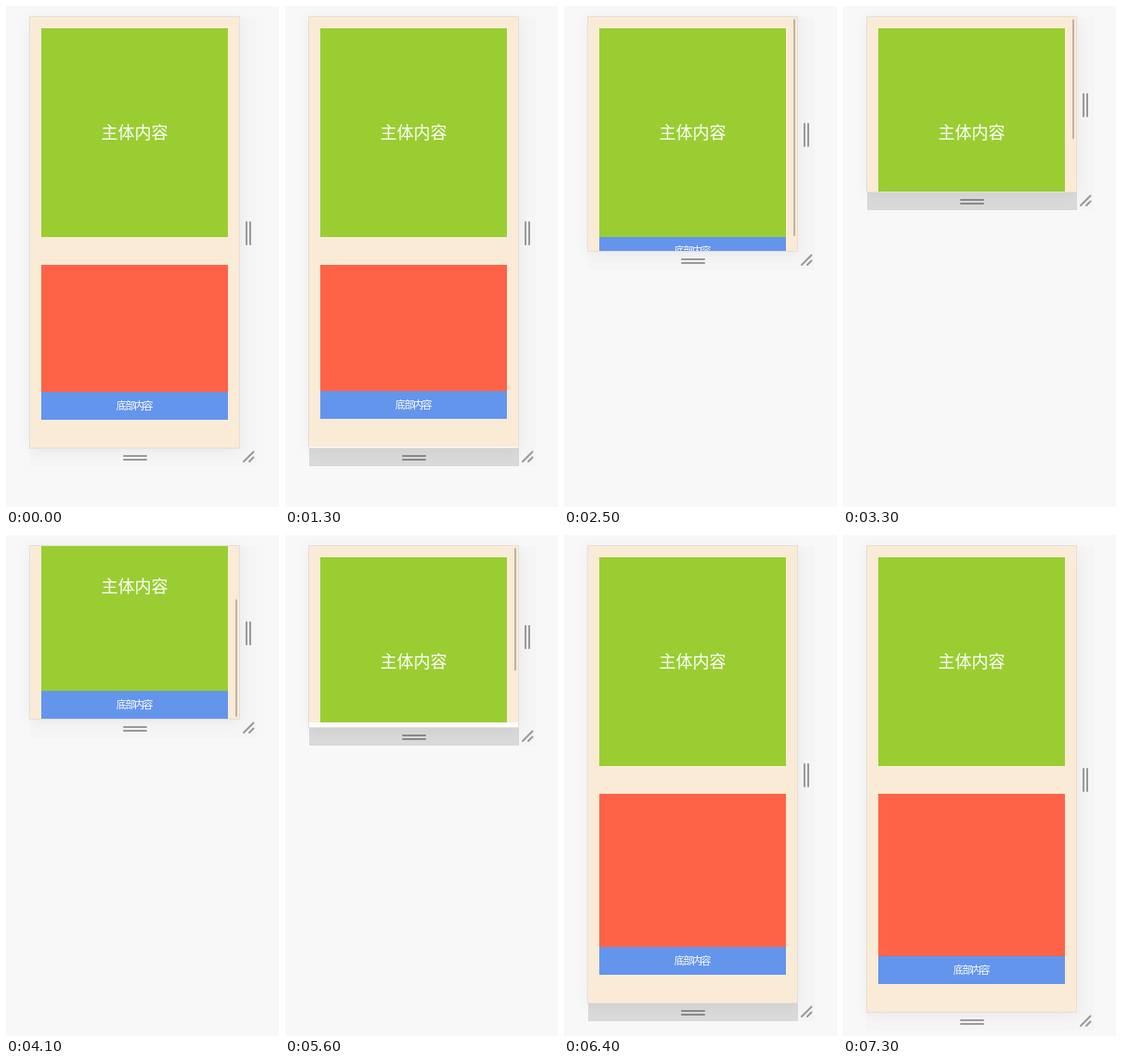
Write an HTML page that moves like this. It is 294x540 px and loops after 7800 ms.

```html
<!DOCTYPE html>
<html lang="zh-CN">
<head>
<meta charset="utf-8">
<title>Sticky footer</title>
<style>
  html, body { margin: 0; width: 100%; height: 100%; overflow: hidden; background: #f8f8f8; }
  svg { display: block; width: 294px; height: 540px; }
  text { fill: #fff; text-anchor: middle; font-weight: 500; font-family: "Noto Sans CJK SC", "Noto Sans CJK", "Noto Sans CJK JP", sans-serif; }
  .small { font-size: 11px; letter-spacing: -1.4px; }
  .grip { fill: none; stroke: #999; stroke-width: 2; stroke-linecap: round; }
  .hover { stroke: #888; }
</style>
</head>
<body>
<svg viewBox="0 0 294 540">
  <defs>
    <filter id="blur" filterUnits="userSpaceOnUse" x="-40" y="-40" width="380" height="640">
      <feGaussianBlur stdDeviation="8"/>
    </filter>
    <clipPath id="view"><rect id="clip" x="26" y="12" width="225"/></clipPath>
  </defs>

  <rect id="handles" x="26" y="12" width="244" fill="#f5f5f5"/>
  <rect id="bar" x="26" width="226" height="20" fill="#d9d9d9"/>
  <rect id="shadow" x="26" y="14" width="225" fill="#000" opacity=".06" filter="url(#blur)"/>
  <rect id="frame" x="25.5" y="11.5" width="226" fill="#fff" stroke="#e4dfd8"/>

  <g clip-path="url(#view)">
    <rect x="26" y="12" width="225" height="528" fill="antiquewhite"/>
    <g id="page">
      <rect x="38" y="24" width="201" height="225" fill="yellowgreen"/>
      <text x="138.5" y="143" font-size="18">主体内容</text>
      <rect id="aside" x="38" y="279" width="201" fill="tomato"/>
      <g id="footer">
        <rect x="38" width="201" height="30" fill="cornflowerblue"/>
        <text class="small" x="138" y="19">底部内容</text>
      </g>
    </g>
    <rect id="thumb" x="247" width="2" rx="1" fill="#000"/>
  </g>

  <path id="sideGrip" class="grip" d="M259-12V12M263-12V12"/>
  <g id="bottom">
    <path id="barGrip" class="grip" d="M127 9H151M127 13H151"/>
    <path class="grip" d="M256 15L266.5 4.5M262 15L266.5 10.5"/>
  </g>
</svg>
<script>
  const LOOP = 7800, STEP = 100;
  const TOP = 12, CONTENT_END = 279, FOOT = 30;
  const TALL = 476, SHORT = 198, MID = 436, FULL = 514;

  const el = Object.fromEntries([...document.querySelectorAll('[id]')].map(e => [e.id, e]));
  const set = (id, attrs) => {
    for (const name in attrs) el[id].setAttribute(name, attrs[name]);
  };
  const move = (id, y) => set(id, { transform: `translate(0 ${y})` });

  const easeIn = n => p => p ** n;
  const easeOut = n => p => 1 - (1 - p) ** n;
  const linear = p => p;
  const ramp = (t, from, to, ease = linear) =>
    ease(Math.min(1, Math.max(0, (t - from) / (to - from))));

  // Bottom edge: dragged up, then pulled down quickly and settled.
  const edgeAt = t => TALL
    + (SHORT - TALL) * ramp(t, 1300, 3400, easeOut(1.7))
    + (MID - SHORT) * ramp(t, 5550, 6000, easeIn(1.5))
    + (FULL - MID) * ramp(t, 6000, 6500, easeOut(1.3));

  // The page repaints late when a drag begins, then catches up.
  const late = (t, from, to, size) => t < from ? 0 : size * (1 - ramp(t, from, to));
  const gapAt = t => late(t, 1300, 3400, 1) + late(t, 5550, 6000, 5.6);

  const scrollAt = t => (CONTENT_END - SHORT) * (ramp(t, 3500, 4100) - ramp(t, 4300, 4700));
  const thumbAlpha = t => 1 - ramp(t, 4900, 5300) + ramp(t, 5500, 5600);
  const between = (t, from, to) => t >= from && t < to;
  const hoverAt = t => between(t, 600, 2500) || between(t, 2600, 3600) || between(t, 5200, 7000);

  function render(time) {
    const t = Math.floor(time % LOOP / STEP) * STEP;
    const bottom = Math.round(edgeAt(t));
    const end = bottom - Math.round(gapAt(t));
    const height = end - TOP;
    const hover = hoverAt(t);

    set('handles', { height: bottom + 20 - TOP });
    set('shadow', { height: bottom - TOP });
    set('frame', { height: bottom - TOP + 1 });
    set('clip', { height });
    set('bar', { y: bottom, visibility: hover ? 'visible' : 'hidden' });
    el.barGrip.classList.toggle('hover', hover);
    move('bottom', bottom);
    move('sideGrip', Math.ceil((bottom + 13) / 2));

    // The footer sticks to the bottom until the main block stops it.
    const footTop = Math.max(249, end - 2 * FOOT);
    set('aside', { height: Math.max(0, footTop - 279) });
    move('footer', footTop);

    const offset = Math.round(scrollAt(t));
    move('page', -offset);
    const ratio = (height - 4) / (CONTENT_END - TOP);
    set('thumb', {
      y: TOP + 2 + offset * ratio,
      height: Math.max(0, height * ratio),
      opacity: end < CONTENT_END ? 0.24 * thumbAlpha(t) : 0
    });
  }

  const start = performance.now();
  function tick() {
    render(performance.now() - start);
    requestAnimationFrame(tick);
  }
  tick();
</script>
</body>
</html>
```
